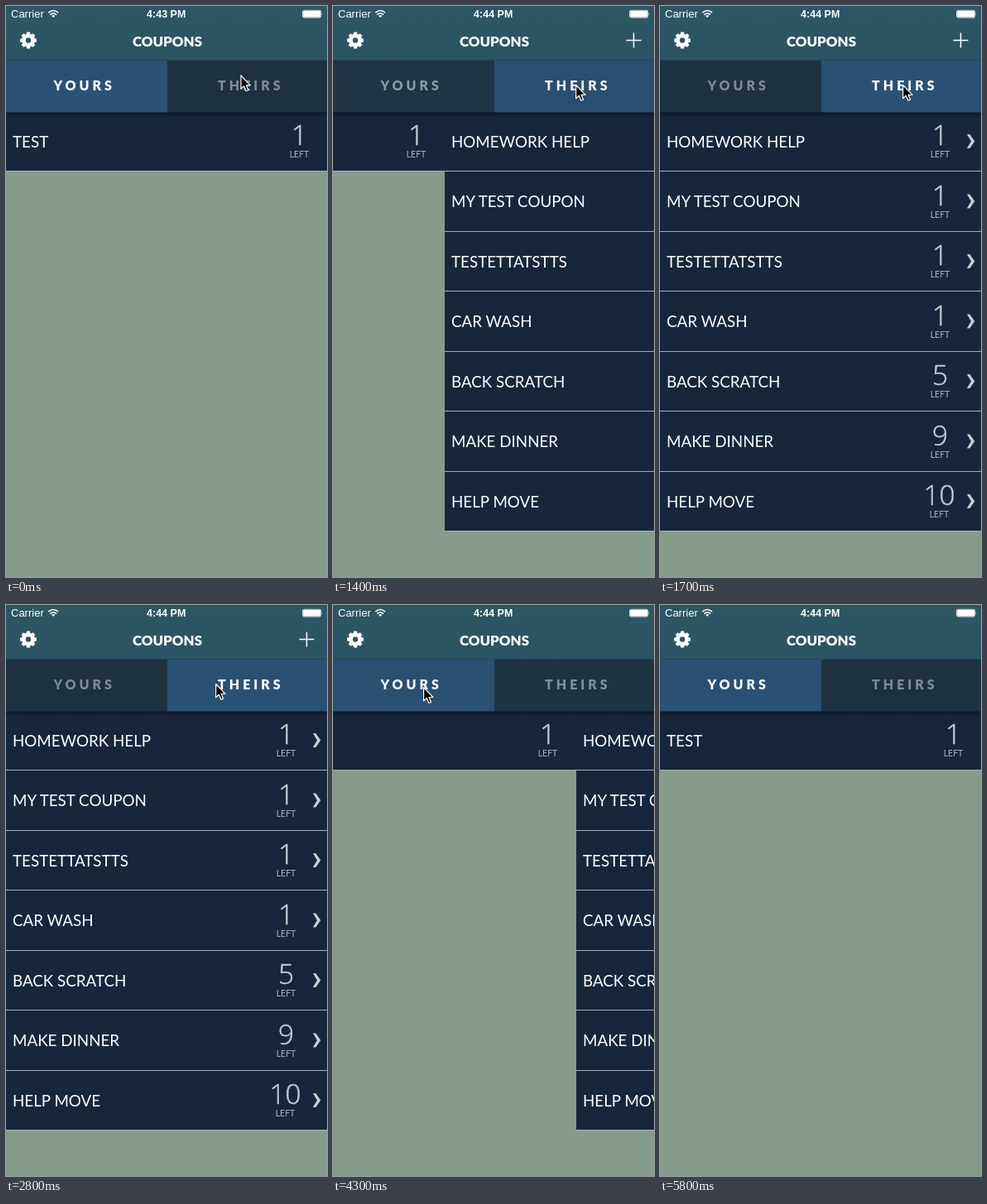
These frames come from a looping animation (388 px wide and 690 px high, 6500 ms). An HTML page:

```html
<!DOCTYPE html>
<html lang="en">
<head>
<meta charset="utf-8">
<title>Coupons</title>
<style>
  html, body { margin: 0; width: 100%; height: 100%; overflow: hidden; background: #859c8c; }
  svg { display: block; width: 388px; height: 690px; }
  text { font-family: Lato, "Open Sans", sans-serif; fill: #fff; }
  .status { font: 13px "Liberation Sans", Arial, sans-serif; }
  .clock { font-weight: 700; font-size: 12.5px; }
  .title { font-size: 16.9px; font-weight: 900; }
  .tab { font-size: 16px; font-weight: 900; letter-spacing: 4px; }
  .name { font-size: 18.8px; }
  .count { font: 300 33.5px "Open Sans", "Noto Sans", sans-serif; fill: #c5ccd0; stroke: #c5ccd0; stroke-width: .5; }
  .left { font-size: 10.5px; fill: #a9b3ba; }
  .mid { text-anchor: middle; }
</style>
</head>
<body>
<svg viewBox="0 0 388 690">
  <defs>
    <linearGradient id="head" x2="0" y2="1">
      <stop stop-color="#2d5763"/><stop offset="1" stop-color="#2a5465"/>
    </linearGradient>
    <linearGradient id="shade" x2="0" y2="1">
      <stop stop-color="#0a121c" stop-opacity=".75"/><stop offset="1" stop-color="#0a121c" stop-opacity="0"/>
    </linearGradient>
  </defs>
  <rect width="388" height="690" fill="#859c8c"/>
  <g id="yours"></g>
  <g id="theirs"></g>
  <rect y="128" width="388" height="7" fill="url(#shade)"/>

  <rect width="388" height="66" fill="url(#head)"/>
  <rect id="tabY" y="66" width="195" height="62.5"/>
  <rect id="tabT" x="195" y="66" width="193" height="62.5"/>
  <rect y="65" width="388" height="1" fill="#1c3a48" opacity=".5"/>
  <text id="txtY" class="tab" x="57.5" y="102">YOURS</text>
  <text id="txtT" class="tab" x="256" y="102">THEIRS</text>
  <text class="title mid" x="195" y="48.7">COUPONS</text>

  <text class="status" x="6" y="14">Carrier</text>
  <g fill="none" stroke="#fff" stroke-width="1.6">
    <path d="M51.3 8.2Q57.2 2.8 63.1 8.2M53.4 10.6Q57.2 7.2 61 10.6"/>
    <path d="M55.2 11.9Q57.2 10.3 59.2 11.9L57.2 14Z" fill="#fff" stroke="none"/>
  </g>
  <text id="clock" class="status clock mid" x="193.7" y="14"></text>
  <rect x="358.5" y="5.3" width="22.2" height="8.8" rx="1.8" fill="none" stroke="#fff" stroke-width=".8"/>
  <rect x="359.2" y="6" width="20.8" height="7.4" rx="1" fill="#fff"/>
  <path d="M381.6 8.2q1.6 1.5 0 3.1z" fill="#fff"/>

  <g id="gear" transform="translate(27 41.5)">
    <circle r="5.5" fill="none" stroke="#fff" stroke-width="4.6"/>
  </g>
  <path id="plus" d="M354.5 41.5h18M363.5 32.5v18" stroke="#fff" stroke-width="1.5"/>
  <path id="cursor" d="M0 0V16.2L3.7 12.8L6.2 18.8L8.9 17.7L6.4 11.8H11.4Z" fill="#000" stroke="#fff" stroke-width="1.2" stroke-linejoin="round"/>
</svg>
<script>
const LOOP = 6500, STEP = 100, PAGE = 389, ROW = 72.5;
const $ = id => document.getElementById(id);

function row(i, name, count, cx, arrow) {
  const y = i * ROW, top = Math.round(y);
  return `<rect y="${top + 127}" width="${PAGE}" height="73" fill="#18263c"/>
    <rect y="${top + 199}" width="${PAGE}" height="1" fill="#a3b0b3"/>
    <g transform="translate(0 ${y})">
      <text class="name" x="8" y="170.7">${name}</text>
      <text class="count mid" x="${cx}" y="168">${count}</text>
      <text class="left mid" x="${cx}" y="183">LEFT</text>
      ${arrow ? '<path d="M371 155h3.4l6 8.5-6 8.5h-3.4l5-8.5z" fill="#c5ccd0"/>' : ''}
    </g>`;
}

// Rows are listed bottom up so that each separator lies over the row below it.
const page = rows => rows.reverse().join("");

const coupons = [["HOMEWORK HELP", 1], ["MY TEST COUPON", 1], ["TESTETTATSTTS", 1], ["CAR WASH", 1],
  ["BACK SCRATCH", 5], ["MAKE DINNER", 9], ["HELP MOVE", 10]];
$("yours").innerHTML = row(0, "TEST", 1, 354.5, false);
$("theirs").innerHTML = page(coupons.map(([n, c], i) => row(i, n, c, c > 9 ? 337.5 : 338.5, true)));

for (let a = 0; a < 360; a += 45) {
  $("gear").insertAdjacentHTML("beforeend",
    `<path d="M-2.6 -7L-1.9 -9.9H1.9L2.6 -7Z" fill="#fff" transform="rotate(${a})"/>`);
}

const clamp = u => Math.min(1, Math.max(0, u));
const easeOut = u => 1 - (1 - clamp(u)) ** 3;
const smooth = u => u * u * (3 - 2 * u);
const mix = (a, b, u) => `rgb(${a.map((v, i) => Math.round(v + (b[i] - v) * u))})`;

const OFF = [29, 50, 62], ON = [42, 81, 116], DIM = [126, 140, 147], LIT = [255, 255, 255];
const OPEN = 1320, BACK = 4200;

// 0 on the first tab, 1 on the second
const shift = (t, span) => easeOut((t - OPEN) / span) - easeOut((t - BACK) / span);

// Cursor path: start time, end time, from, to, easing
const moves = [
  [0, 500, [284, 84], [293.7, 95.5], smooth],
  [2500, 2800, [293.7, 95.5], [253.7, 95.5], u => u * u],
  [2800, 3200, [253.7, 95.5], [109.6, 99.7], u => u * (2 - u)],
  [5300, 5400, [109.6, 99.7], [118, 112], u => u]
];

function cursorAt(t) {
  const [a, b, p, q, ease] = moves.filter(m => t >= m[0]).pop();
  const u = ease(clamp((t - a) / (b - a)));
  return p.map((v, i) => v + (q[i] - v) * u);
}

function draw(t) {
  const x = Math.ceil(PAGE * (1 - shift(t, 268)));
  const s = shift(t, 150);
  $("theirs").setAttribute("transform", `translate(${x} 0)`);
  $("yours").setAttribute("transform", `translate(${x - PAGE} 0)`);
  $("tabY").setAttribute("fill", mix(ON, OFF, s));
  $("tabT").setAttribute("fill", mix(OFF, ON, s));
  $("txtY").style.fill = mix(LIT, DIM, s);
  $("txtT").style.fill = mix(DIM, LIT, s);
  $("plus").style.display = t > OPEN && t <= BACK ? "" : "none";
  $("clock").textContent = t < 900 ? "4:43 PM" : "4:44 PM";
  $("cursor").style.display = t < 5500 ? "" : "none";
  $("cursor").setAttribute("transform", `translate(${cursorAt(t)})`);
}

const start = performance.now();
function tick() {
  const t = (performance.now() - start) % LOOP;
  draw(Math.floor(t / STEP) * STEP);
  requestAnimationFrame(tick);
}
tick();
</script>
</body>
</html>
```
